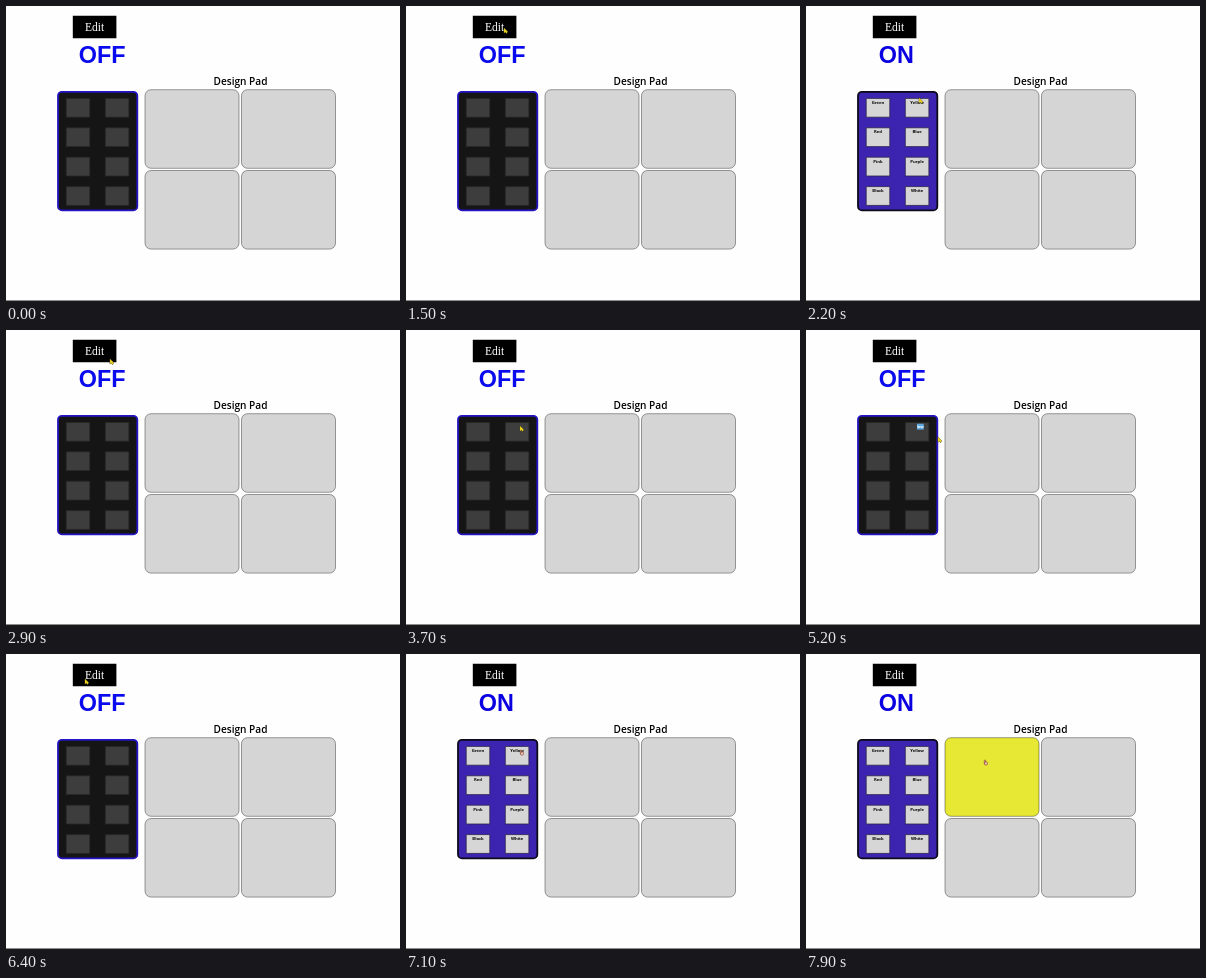
Write an HTML page with a canvas that moves like this. It is 394 px wide and 296 px high and loops after 8 s.

```html
<!DOCTYPE html>
<html lang="en">
<head>
<meta charset="utf-8">
<title>Design Pad</title>
<style>
html, body { margin: 0; width: 100%; height: 100%; overflow: hidden; background: #fefefe; }
canvas { display: block; width: 394px; height: 296px; }
</style>
</head>
<body>
<canvas id="stage" width="394" height="296"></canvas>
<script>
const ctx = document.getElementById('stage').getContext('2d');
const LOOP = 8000, STEP = 100;
const UI = '"Open Sans", "Noto Sans", sans-serif';
const LABEL_FONT = 'bold 4.2px ' + UI;
const LABELS = ['Green', 'Yellow', 'Red', 'Blue', 'Pink', 'Purple', 'Black', 'White'];
const TILE_W = 24.4, TILE_H = 19.6;

// Places the pointer visits
const entry = [234, 238], button = [98, 22], corner = [104, 29], buttonText = [79, 25];
const chip = [114, 96], panelEdge = [132, 107], padLeft = [150, 104], padMid = [168, 107], drop = [178, 106];

// Each trip: start time, end time, destination
const TRIPS = [
  [100, 1500, button], [1600, 2300, chip], [2300, 2600, corner], [2900, 3600, chip],
  [3700, 4300, padLeft], [4500, 4900, chip], [4900, 5200, panelEdge], [5200, 5500, padMid],
  [5600, 6400, buttonText], [6500, 7000, chip], [7200, 7700, drop]
];

function pointerAt(t) {
  if (t < TRIPS[0][0]) return null;
  let [x, y] = entry;
  for (const [from, to, [tx, ty]] of TRIPS) {
    const k = Math.min(1, Math.max(0, (t - from) / (to - from)));
    const e = k * k * (3 - 2 * k);
    x += (tx - x) * e;
    y += (ty - y) * e;
  }
  return { x, y };
}

const within = (t, a, b) => t >= a && t < b;

// Text selection: its left end, and whether it reaches the heading
function selectionAt(t) {
  if (within(t, 3900, 4600)) return { from: 114, all: t >= 4100 };
  if (within(t, 5000, 5700)) return { from: 111, all: t >= 5300 };
  return null;
}

function box(x, y, w, h, r, fill, line, lw) {
  ctx.beginPath();
  ctx.roundRect(x, y, w, h, r);
  ctx.fillStyle = fill;
  ctx.fill();
  if (line) {
    ctx.strokeStyle = line;
    ctx.lineWidth = lw;
    ctx.stroke();
  }
}

function text(str, x, y, font, color, align = 'left') {
  ctx.font = font;
  ctx.fillStyle = color;
  ctx.textAlign = align;
  ctx.fillText(str, x, y);
}

function tile(x, y, label, on) {
  box(x + .4, y + .4, TILE_W - .8, TILE_H - .8, 0,
    on ? '#d6d6d6' : '#3d3d3d', on ? '#2c2548' : '#262626', .8);
  if (on) text(label, x + TILE_W / 2, y + 6, LABEL_FONT, '#000', 'center');
}

function markLabel(x, y, label, from) {
  ctx.font = LABEL_FONT;
  const w = ctx.measureText(label).width;
  const cx = x + TILE_W / 2, left = from || cx - w / 2;
  ctx.save();
  ctx.beginPath();
  ctx.rect(left, y + 1.4, cx + w / 2 - left, 6.4);
  ctx.clip();
  ctx.fillStyle = '#5fa9e0';
  ctx.fill();
  text(label, cx, y + 6, LABEL_FONT, '#fff', 'center');
  ctx.restore();
}

function palette(on, sel) {
  box(52, 85.8, 79.3, 118.6, 4, on ? '#3c24b0' : '#151515', on ? '#0a0a18' : '#2414c4', 1.8);
  LABELS.forEach((label, i) => {
    const x = i % 2 ? 98.9 : 59.8, y = 92 + (i >> 1) * 29.4;
    tile(x, y, label, on);
    if (!sel) return;
    if (i === 1) markLabel(x, y, label, sel.from);
    else if (i > 1 && sel.all) markLabel(x, y, label);
  });
}

function pads(painted) {
  for (let i = 0; i < 4; i++) {
    const x = 139 + (i % 2) * 96.5, y = 83.7 + (i >> 1) * 80.8;
    box(x, y, 94, 78.6, 6, i === 0 && painted ? '#e6e833' : '#d5d5d5', 'rgba(0, 0, 0, .42)', .9);
  }
}

function arrow(x, y) {
  ctx.beginPath();
  ctx.moveTo(x, y);
  ctx.lineTo(x, y + 5);
  ctx.lineTo(x + 1.4, y + 4);
  ctx.lineTo(x + 2.6, y + 5.6);
  ctx.lineTo(x + 3.6, y + 3.5);
  ctx.closePath();
  ctx.strokeStyle = '#4a400c';
  ctx.lineWidth = .8;
  ctx.stroke();
  ctx.fillStyle = '#e6cf22';
  ctx.fill();
}

function hand(x, y) {
  box(x + .3, y, 1.3, 4, .6, '#f4d9c0', '#8b3a2c', .7);
  box(x + .6, y + 2, 2.8, 3, 1, '#f4d9c0', '#8b3a2c', .7);
}

function draw(t) {
  const on = within(t, 1700, 2800) || t >= 6500;
  const sel = selectionAt(t), p = pointerAt(t);
  const marked = sel && sel.all;
  ctx.fillStyle = '#fefefe';
  ctx.fillRect(0, 0, 394, 296);

  box(66.8, 9.8, 43.6, 22.5, 0, '#000');
  text('Edit', 88.5, 25, '11.5px "Liberation Serif", serif', '#fff', 'center');
  text(on ? 'ON' : 'OFF', 72.8, 57, 'bold 23.4px "Liberation Sans", sans-serif', on ? '#0a00e0' : '#0a0aee');

  if (marked) box(208, 68, 53, 14, 0, '#0f7ad0');
  text('Design Pad', 234.5, 79, '600 10.1px ' + UI, marked ? '#fff' : '#000', 'center');

  pads(t >= 7900);
  palette(on, sel);
  box(0, 294.6, 394, 1.4, 0, '#1c1c1c');

  if (!p) return;
  if (within(t, 7200, 7900)) {
    ctx.globalAlpha = .6;
    tile(p.x - 19, p.y - 4, 'Yellow', true);
    ctx.globalAlpha = 1;
  }
  (t >= 7000 ? hand : arrow)(p.x, p.y);
}

const start = performance.now();
function frame() {
  const t = (performance.now() - start) % LOOP;
  draw(Math.floor(t / STEP) * STEP);
  requestAnimationFrame(frame);
}
frame();
</script>
</body>
</html>
```
